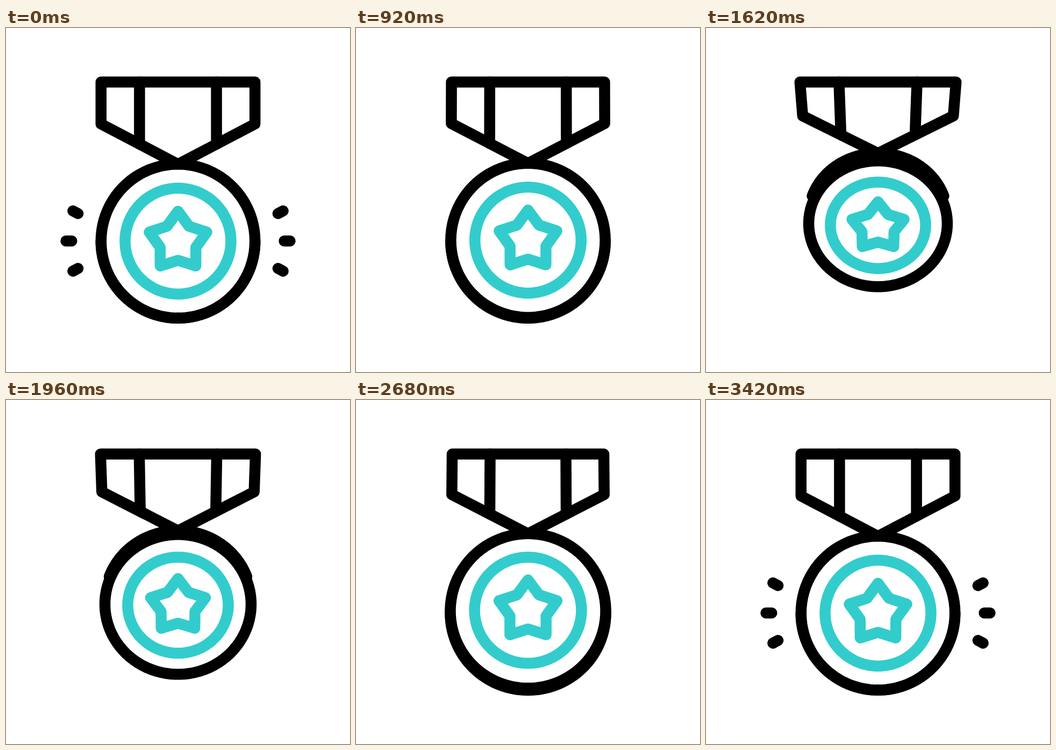
Write an HTML page that moves like this. It is 640 by 640 pixels and loops after 3600 ms.

```html
<!DOCTYPE html>
<html lang="en">
<head>
<meta charset="utf-8">
<title>Swinging medal</title>
<style>
html, body { margin: 0; width: 100%; height: 100%; overflow: hidden; background: #fff; }
svg { display: block; width: 100vw; height: 100vh; }
path { fill: none; stroke: #000; stroke-width: 20.5; stroke-linecap: round; stroke-linejoin: round; }
.solid { fill: #fff; }
.teal { stroke: #33cccc; }
</style>
</head>
<body>
<svg viewBox="0 0 640 640">
  <path id="rays"/>
  <path id="rim"/>
  <path id="ribbon" class="solid"/>
  <path id="stripes"/>
  <path id="disc" class="solid"/>
  <path id="ring" class="teal"/>
  <path id="star" class="teal"/>
</svg>
<script>
const LOOP = 3600, CX = 320, BAR = 100.5, CY = 396.5, R = 143.2;

// Swing timing: ease to the back, swing with short holds, ease to rest
const FIRST = 602, HALF = 560, HOLD = 65, EASE = 460;
const RELEASE = FIRST + 3 * HALF + HOLD;

// Perspective at both ends of the swing: depth at the bar, depth per px below it, height scale
const FRONT = { near: 1.2547, tilt: 0.001247, tall: 0.632 };
const BACK = { near: 0.977, tilt: -0.00077, tall: 1.02 };

const clamp = v => Math.min(1, Math.max(0, v));
const lerp = (a, b, k) => a + (b - a) * k;

// -1 is fully back, 0 at rest, 1 fully forward
function swing(t) {
  if (t < FIRST) return -(clamp((t - FIRST + EASE) / EASE) ** 2);
  if (t > RELEASE) return (1 - clamp((t - RELEASE) / EASE)) ** 2;
  const n = Math.floor((t - FIRST) / HALF), u = (t - FIRST) % HALF;
  const side = n % 2 ? 1 : -1;
  return side * (1 - 2 * clamp((u - HOLD) / (HALF - HOLD)));
}

// Moves a point, given as offset from the centre line and height at rest, into the pose
function place([x, y], s, lift = 0) {
  const { near, tilt, tall } = s < 0 ? BACK : FRONT;
  const k = Math.abs(s), u = y - BAR, m = 1 / (near - tilt * u);
  return [CX + lerp(x, x * m, k), lerp(y, BAR + u * tall * m, k) + lift];
}

const poly = pts => 'M' + pts.map(p => p.map(v => v.toFixed(2)).join()).join('L');

function arc(r, from = 0, to = 2 * Math.PI, steps = 90) {
  return Array.from({ length: steps + 1 }, (_, i) => {
    const a = lerp(from, to, i / steps);
    return [r * Math.cos(a), CY + r * Math.sin(a)];
  });
}

const STAR = Array.from({ length: 10 }, (_, i) => {
  const a = i * Math.PI / 5, r = i % 2 ? 35 : 56.3;
  return [r * Math.sin(a), CY + 0.7 - r * Math.cos(a)];
});

// The far edge shows below the disc on a front swing and above it on a back swing.
function rimPath(s, lift) {
  if (s < 0) return poly(arc(R, -0.37, 0.37 - Math.PI).map(p => place(p, s, lift)));
  const a = 0.2 * s, half = arc(R, a, Math.PI - a);
  const low = half.map(p => place(p, s, lift));
  return poly([place(half[0], s), ...low, place(half[half.length - 1], s)]);
}

function raysPath(t) {
  const leaving = t < RELEASE;
  let d = '';
  for (let i = -1; i <= 1; i++) {
    const grown = clamp((t - RELEASE - EASE) / (i ? 560 : 400));
    const from = leaving ? clamp(t / 320) ** 2 : 0;
    const to = leaving ? 1 : 1 - (1 - grown) ** 2;
    if (to - from < 0.01) continue;
    const a = i * Math.PI / 6.4;
    for (const side of [-1, 1]) {
      const at = k => [
        CX + side * (197.7 - 11.7 * Math.abs(i) + 10.8 * k * Math.cos(a)),
        CY - 0.2 + 51 * i + 10.8 * k * Math.sin(a)
      ];
      d += poly([at(from), at(to)]);
    }
  }
  return d;
}

function draw(t) {
  const s = swing(t), lift = s * (s < 0 ? 24 : 50);
  const set = (id, d) => document.getElementById(id).setAttribute('d', d);
  const shape = pts => poly(pts.map(p => place(p, s))) + 'Z';
  // The ribbon's lower end hangs from the far edge when the medal swings back.
  const hang = p => place(p, s, Math.min(0, lift));
  const top = x => place([x, BAR], s);

  set('rays', raysPath(t));
  set('rim', rimPath(s, lift));
  set('ribbon', poly([top(-R), top(R), hang([R, 178.5]), hang([0, 253.5]), hang([-R, 178.5])]) + 'Z');
  set('stripes', [-R / 2, R / 2].map(x => poly([top(x), hang([x, 216])])).join(''));
  set('disc', shape(arc(R)));
  set('ring', shape(arc(98.5)));
  set('star', shape(STAR));
}

const start = performance.now();
function tick() {
  draw((performance.now() - start) % LOOP);
  requestAnimationFrame(tick);
}
tick();
</script>
</body>
</html>
```
